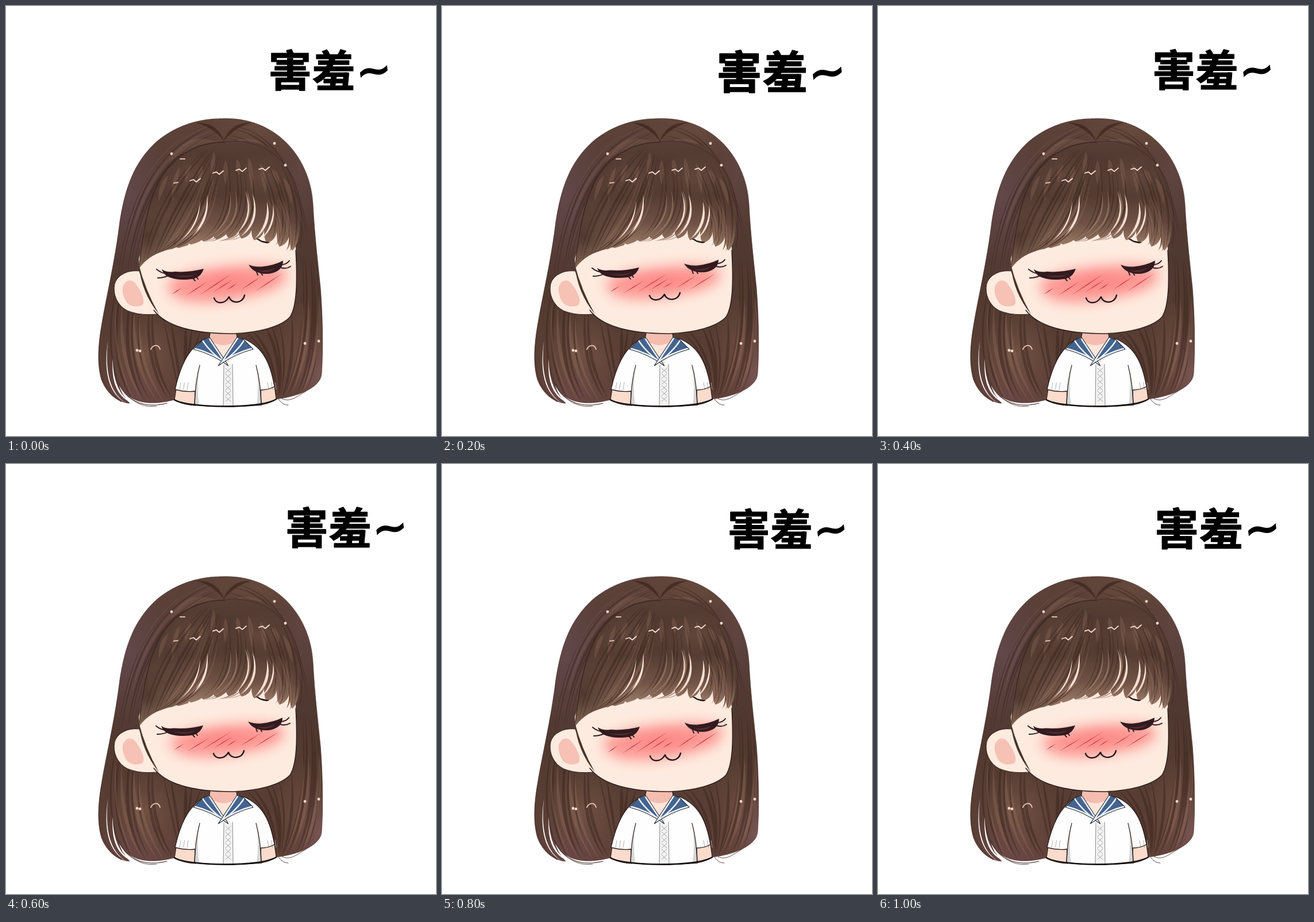
An HTML page with a canvas for the animation above (1.2 s loop, 748 by 748 pixels).

```html
<!DOCTYPE html>
<html lang="zh">
<head>
<meta charset="utf-8">
<title>害羞~</title>
<style>
html, body { margin: 0; width: 100%; height: 100%; overflow: hidden; background: #fff; }
canvas { display: block; width: 748px; height: 748px; }
</style>
</head>
<body>
<canvas id="stage" width="748" height="748"></canvas>
<script>
const SIZE = 748, STEP = 200;
const stage = document.getElementById('stage').getContext('2d');
let ctx = stage;

const INK = '#2b1a18', SKIN = '#feebdf';
const DARK = 'rgba(52,31,26,.42)', LIGHT = 'rgba(165,124,104,.26)';

function fill(d, color) {
  ctx.fillStyle = color;
  ctx.fill(new Path2D(d));
}

function line(d, color, width = 1.5) {
  ctx.strokeStyle = color;
  ctx.lineWidth = width;
  ctx.lineCap = ctx.lineJoin = 'round';
  ctx.stroke(new Path2D(d));
}

// Tapered stroke: pointed at both ends, widest in the middle
function strand([x0, y0, x1, y1, x2, y2], width, color) {
  const dx = x2 - x0, dy = y2 - y0, len = Math.hypot(dx, dy) || 1;
  const nx = -dy / len * width, ny = dx / len * width;
  ctx.beginPath();
  ctx.moveTo(x0, y0);
  ctx.quadraticCurveTo(x1 + nx, y1 + ny, x2, y2);
  ctx.quadraticCurveTo(x1 - nx, y1 - ny, x0, y0);
  ctx.fillStyle = color;
  ctx.fill();
}

// Strands spread between two border curves
function fan(a, b, count, width, color) {
  for (let i = 0; i < count; i++) {
    const t = (i + 0.5 + 0.3 * Math.sin(i * 4.1)) / count;
    strand(a.map((v, k) => v + (b[k] - v) * t), width * (0.6 + 0.6 * Math.sin(i * 2.3) ** 2), color);
  }
}

function ramp(y0, y1, ...colors) {
  const g = ctx.createLinearGradient(0, y0, 0, y1);
  colors.forEach((c, i) => g.addColorStop(i / (colors.length - 1), c));
  return g;
}

function glow(x, y, rx, ry, rgb, alpha) {
  ctx.save();
  ctx.translate(x, y);
  ctx.scale(rx, ry);
  const g = ctx.createRadialGradient(0, 0, 0, 0, 0, 1);
  g.addColorStop(0, `rgba(${rgb},${alpha})`);
  g.addColorStop(1, `rgba(${rgb},0)`);
  ctx.fillStyle = g;
  ctx.fillRect(-1, -1, 2, 2);
  ctx.restore();
}

function clipped(d, draw) {
  ctx.save();
  ctx.clip(new Path2D(d));
  draw();
  ctx.restore();
}

// Draws once as is and once mirrored about the vertical line at x
function mirrored(x, draw) {
  draw();
  ctx.save();
  ctx.translate(2 * x, 0);
  ctx.scale(-1, 1);
  draw();
  ctx.restore();
}

const HAIR = 'M372 196C330 196 290 212 262 236C222 272 207 318 198 375C190 440 178 490 168 545' +
  'C160 590 158 622 166 650C176 676 196 690 215 691Q200 676 195 655C206 684 240 700 296 684L469 684' +
  'C505 680 547 665 549 640C552 600 551 540 547 490C542 440 537 400 534 345C530 265 470 190 372 196Z';

const FACE = 'M231 440C233 478 246 513 263 536C285 560 335 570 395 570C440 568 478 558 494 541' +
  'C506 522 507 480 504 420L480 340L260 340Z';

// Fringe whose lower edge is a row of curled tips
function fringe() {
  let d = 'M380 236C330 236 290 262 265 305C245 345 235 400 232 456Q250 430 290 422';
  for (let i = 0; i < 10; i++) {
    const x = 300 + 22 * i, y = 421 - 19 * Math.sin(Math.PI * i / 9) + i / 2;
    d += `Q${x - 5} ${y - 4} ${x} ${y}`;
    if (i < 9) d += `Q${x + 14} ${y - 4} ${x + 17} ${y - 5 - 2 * i}`;
  }
  return d + 'C510 415 514 385 508 350C500 300 485 262 455 244C430 233 400 233 380 236Z';
}

function backHair() {
  fill(HAIR, ramp(196, 694, '#5d4238', '#553d36', '#4f382f', '#573d33', '#604239'));
  clipped(HAIR, () => {
    glow(215, 335, 70, 150, '112,82,94', 0.5);
    glow(440, 215, 100, 50, '122,88,70', 0.35);
    glow(512, 290, 45, 120, '112,80,80', 0.35);
    glow(245, 605, 70, 75, '134,98,80', 0.5);
    glow(225, 680, 90, 60, '115,76,80', 0.5);
    glow(512, 600, 45, 90, '132,92,76', 0.4);
    glow(548, 645, 40, 90, '145,105,112', 0.5);
    fan([360, 198, 215, 250, 190, 480], [378, 236, 255, 280, 228, 450], 5, 4, DARK);
    fan([360, 200, 240, 230, 205, 400], [378, 234, 270, 270, 238, 400], 3, 8, 'rgba(140,108,100,.2)');
    fan([384, 203, 500, 210, 532, 420], [382, 234, 490, 250, 510, 400], 4, 4, DARK);
    fan([190, 470, 155, 610, 205, 690], [262, 535, 258, 620, 298, 682], 7, 5, DARK);
    fan([185, 510, 175, 610, 215, 685], [240, 540, 235, 620, 285, 690], 4, 6, LIGHT);
    fan([512, 430, 525, 590, 475, 684], [544, 450, 560, 600, 530, 668], 5, 5, DARK);
    fan([510, 510, 515, 600, 480, 678], [546, 500, 555, 590, 520, 670], 3, 6, LIGHT);
    fan([265, 540, 280, 600, 300, 684], [350, 568, 340, 590, 318, 610], 5, 5, DARK);
    fan([405, 567, 460, 600, 468, 680], [500, 535, 505, 620, 480, 684], 6, 5, DARK);
  });
  line(HAIR, 'rgba(62,40,38,.6)', 1);
  fan([172, 560, 155, 660, 200, 690], [194, 645, 200, 685, 235, 693], 2, 3, '#fff');
  line('M166 560C156 620 162 662 200 688M197 655C205 682 235 702 280 691', '#503831', 1.2);
  line('M210 676Q232 700 262 696M474 684Q482 695 491 694M480 683C494 690 505 680 522 670', '#654944', 1);
}

function crown() {
  mirrored(379, () => {
    strand([380, 236, 364, 206, 330, 203], 6, 'rgba(60,36,28,.7)');
    strand([364, 236, 320, 228, 284, 272], 13, 'rgba(145,110,92,.25)');
  });
}

function bangs() {
  const shape = fringe();
  fill(shape, ramp(236, 425, '#573f35', '#4e372f', '#543c32', '#6f5245', '#a5846f'));
  clipped(shape, () => {
    glow(245, 400, 75, 100, '80,57,47', 1);
    glow(520, 350, 55, 90, '82,58,48', 0.9);
    mirrored(385, () => glow(325, 295, 70, 40, '130,98,80', 0.35));
    // broken shine along an arc
    for (let i = 0; i < 11; i++) {
      const x = 282 + i * 20, u = (x - 383) / 110;
      const y = 278 + 38 * u * u + 6 * Math.sin(i * 2.7), h = 30 + 12 * Math.sin(i * 1.9);
      strand([x, y - h / 2, x + u * 12, y, x + u * 18, y + h], 8, 'rgba(150,114,95,.3)');
    }
    fan([352, 242, 255, 320, 234, 450], [376, 260, 375, 365, 296, 421], 8, 4, DARK);
    fan([340, 300, 315, 380, 262, 428], [372, 310, 370, 380, 315, 415], 5, 4, LIGHT);
    fan([376, 270, 390, 370, 335, 408], [425, 280, 450, 360, 400, 402], 6, 3, DARK);
    fan([382, 320, 392, 375, 340, 404], [435, 320, 455, 370, 415, 402], 4, 4, 'rgba(206,170,146,.4)');
    fan([430, 270, 475, 350, 452, 402], [480, 275, 520, 350, 501, 426], 6, 3, DARK);
    fan([446, 330, 474, 370, 470, 405], [485, 330, 502, 380, 500, 422], 4, 4, LIGHT);
  });
  // skin between the locks
  fan([330, 346, 322, 385, 298, 408], [362, 318, 372, 380, 322, 406], 2, 4, '#fde3d4');
  fan([408, 318, 428, 370, 386, 400], [474, 350, 476, 385, 452, 408], 4, 4, '#fbe0d1');
  // loose ends
  fan([300, 395, 285, 415, 252, 434], [352, 380, 335, 405, 300, 420], 4, 2, '#573c31');
  fan([376, 390, 362, 406, 338, 411], [440, 375, 425, 405, 396, 407], 5, 1.5, '#8a6853');
  fan([470, 380, 476, 405, 464, 415], [500, 390, 506, 415, 498, 430], 4, 1.8, '#6b4a3b');
  line('M380 237C330 237 290 262 266 305C246 345 238 395 232 450', 'rgba(50,29,25,.65)', 1.7);
  line('M381 236C430 231 476 250 500 300C514 335 518 380 512 420', 'rgba(50,29,25,.3)', 1.5);
}

function dot(x, y, r, color) {
  ctx.beginPath();
  ctx.arc(x, y, r, 0, 7);
  ctx.fillStyle = color;
  ctx.fill();
}

function sparkles() {
  for (let i = 0; i < 4; i++) {
    const x = 329 + 40 * i, y = 302 - 21 * (1 - Math.exp(-i));
    line(`M${x - 9} ${y + 2}l6 -2l5 4l7 -6`, '#f6ded0', 1.8);
  }
  line('M303 266h8M292 308l7 -1M252 597C256 589 265 588 268 597', '#dec0af', 2);
  for (const [x, y] of [[288, 257], [467, 239], [486, 277], [228, 599], [233, 600], [520, 587], [544, 583]]) {
    dot(x, y, 2.4, '#f5d9cc');
  }
}

function body() {
  const arms = 'M296 666L293 686Q312 695 331 695V666ZM443 666V694Q458 692 470 684L467 662Z';
  fill(arms, '#fbdccc');
  line(arms, INK, 1);
  const shirt = 'M345 579C314 598 302 632 294 667Q312 672 329 670L328 694Q386 699 444 694L443 668' +
    'Q456 668 467 662C460 622 448 594 414 579Z';
  fill(shirt, '#fefefe');
  mirrored(386, () => {
    fill('M337 625Q331 660 336 695H328Q328 650 337 625Z', '#d5d6d5');
    line('M337 625Q329 655 328 694', '#413634', 1.3);
    for (let i = 0; i < 3; i++) line(`M${304 + 6.5 * i} 655l-2 12`, '#aaa6a5', 0.9);
  });
  line(shirt, INK, 1.3);

  fill('M379 625H394L395 695H378Z', '#f3f3f3');
  line('M379 624L378 695M394 623L395 695', '#8a8786', 1);
  for (let y = 630; y < 690; y += 10) {
    line(`M382 ${y}l9 8M391 ${y}l-9 8`, '#a09c9b', 0.9);
  }

  // neck and sailor collar
  fill('M356 568L353 578L386 624L402 578L400 568Z', '#fde5da');
  fill('M356 566L355 582Q378 598 401 582L400 566Z', '#f5bdb0');
  const collar = 'M354 576L342 581L326 597Q360 606 387 626Z';
  mirrored(378, () => {
    ctx.save();
    ctx.beginPath();
    ctx.rect(300, 560, 87, 80);
    ctx.clip();
    fill(collar, '#44648f');
    clipped(collar, () => {
      line('M354 576L387 626M326 597Q360 606 387 626', '#f5f7fa', 6);
      line('M341 580Q352 600 387 626', '#f5f7fa', 2.5);
    });
    line(collar, '#26303f', 1.1);
    ctx.restore();
  });
  line('M355 570L353 579M401 570L402 577', INK, 1.2);
  line('M293 685C318 700 443 701 470 684', '#14100f', 2.4);
}

function head() {
  const ear = 'M232 461C214 459 194 466 189 483C185 502 194 522 211 530Q232 539 263 536L242 490Z';
  fill(ear, SKIN);
  line(ear, '#3d2823', 1.2);
  fill('M203 489C207 476 219 473 227 485C237 499 244 516 236 521Q222 526 211 517Q201 503 203 489Z', '#f5c2b5');
  fill(FACE, SKIN);
  line('M257 529C280 560 335 570 395 570C440 568 478 558 494 541C506 522 507 480 504 425', INK, 1.4);
}

function paintGirl() {
  backHair();
  crown();
  body();
  head();
  bangs();
  strand([231, 450, 239, 497, 266, 536], 4, '#49322a');
  sparkles();
}

function blush() {
  ctx.save();
  ctx.filter = 'blur(11px)';
  fill('M282 482C305 456 440 442 482 456C500 476 470 496 430 503C380 516 330 520 298 508Q280 498 282 482Z', 'rgba(252,100,100,.62)');
  ctx.restore();
  glow(385, 480, 75, 28, '250,85,88', 0.2);
  for (let i = 0; i < 7; i++) {
    const x = 288 + 24 * i, y = 502 + 4 * Math.sin(i * 1.1) - i;
    const len = 18 + 44 * Math.sin(i * 0.8) ** 2 * (1 - i / 20);
    strand([x, y, x + len / 2, y - len * 0.33, x + len, y - len * 0.66], 1.5, '#cf3442');
  }
}

function features(squeezed) {
  ctx.save();
  if (squeezed) {
    ctx.translate(386, 478);
    ctx.scale(0.96, 0.9);
    ctx.translate(-386, -480);
  }
  blush();
  ctx.restore();

  ctx.save();
  if (squeezed) {
    ctx.translate(-1, 405);
    ctx.scale(1, 0.957);
    ctx.translate(0, -405);
  }
  const lid = '#321b1f';
  fill('M271 458Q280 464 293 462Q318 464 344 457Q340 470 328 474C312 478 290 476 280 470Q273 465 271 458Z', lid);
  fill('M422 450Q434 455 448 453Q466 451 482 443Q482 460 462 465C446 468 430 464 422 450Z', lid);
  fill('M290 468Q312 472 332 466Q314 476 290 468ZM438 460Q455 462 470 455Q456 467 438 460Z', '#5c3035');
  line('M262 458Q270 465 281 466M264 473Q274 473 282 469M324 472l5 6M330 470l4 5', lid, 2);
  line('M478 450Q488 450 493 443M475 454Q486 459 495 453M436 463l2 5M444 464l2 4', lid, 2);
  fill('M435 405Q440 404 444 408Q452 410 459 411Q456 415 443 410Z', '#251414');
  line('M362 508C365 518 380 520 388 506C392 519 412 518 415 503', '#28171a', 2.5);
  ctx.restore();
}

// Centre of the first character and scale, one per step
const POSES = [[494, 111, 1], [517, 114, 1.05], [514.5, 110, 0.99], [523, 110, 0.995], [533.5, 113, 0.98], [519.5, 111.5, 1.02]];

function caption([x, y, scale]) {
  ctx.save();
  ctx.translate(x, y);
  ctx.scale(scale, scale);
  ctx.fillStyle = ctx.strokeStyle = '#000';
  ctx.lineJoin = 'round';
  ctx.lineWidth = 1.2;
  ctx.textAlign = 'center';
  ctx.font = '900 75px "Noto Sans CJK SC", "Noto Sans CJK JP", "Noto Sans CJK", sans-serif';
  [...'害羞'].forEach((c, i) => {
    ctx.fillText(c, i * 76, 29);
    ctx.strokeText(c, i * 76, 29);
  });
  ctx.translate(145.5, 0);
  ctx.rotate(-0.14);
  ctx.font = 'bold 77px "DejaVu Sans", sans-serif';
  ctx.fillText('~', 0, 27);
  ctx.restore();
}

const girl = document.createElement('canvas');
girl.width = girl.height = SIZE;
ctx = girl.getContext('2d');
paintGirl();
ctx = stage;

function draw() {
  const step = Math.floor(performance.now() / STEP) % POSES.length;
  ctx.fillStyle = '#fff';
  ctx.fillRect(0, 0, SIZE, SIZE);
  ctx.drawImage(girl, 0, 0);
  features(step % 2 === 1);
  caption(POSES[step]);
  requestAnimationFrame(draw);
}
draw();
</script>
</body>
</html>
```
